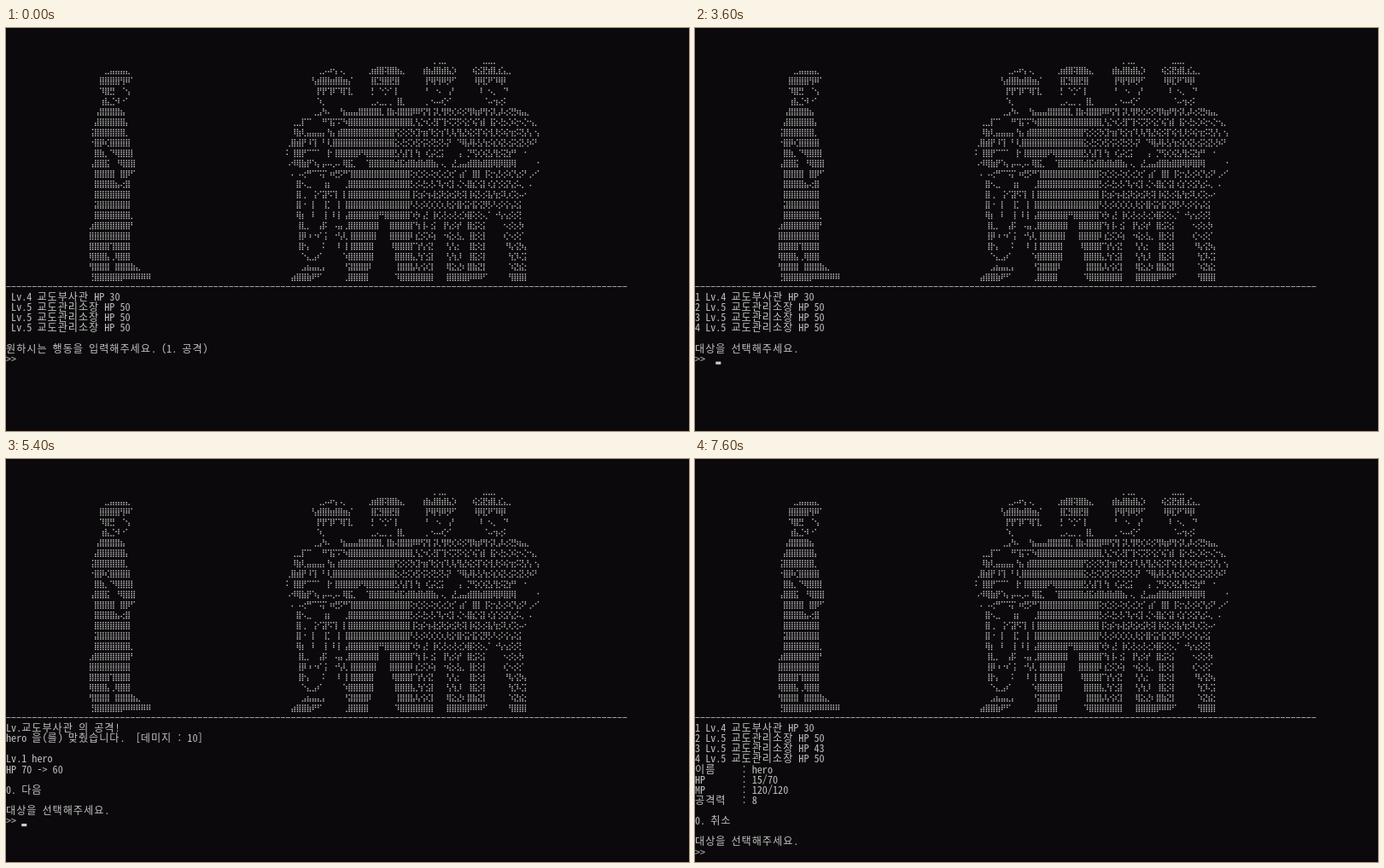
An HTML page that plays this animation: 800x473 px, repeating every 8000 ms.

```html
<!DOCTYPE html>
<html lang="ko">
<head>
<meta charset="utf-8">
<title>Console battle</title>
<style>
html, body { margin: 0; width: 100%; height: 100%; overflow: hidden; background: #0b090b; }
svg { display: block; width: 800px; height: 473px; }
text {
  font: 12.13px "Noto Sans Mono CJK KR", "Noto Sans CJK KR", "Noto Sans CJK", "Noto Sans Mono", monospace;
  fill: #c2c2c2;
  white-space: pre;
}
</style>
</head>
<body>
<svg viewBox="0 0 800 473" xmlns="http://www.w3.org/2000/svg">
  <g id="scene">
    <path id="art" fill="#bcbcbc"/>
    <line x1="0.4" x2="728" y1="303.5" y2="303.5" stroke="#a0a0a0" stroke-dasharray="5 1.067"/>
  </g>
  <g id="lines"></g>
  <rect id="cursor" width="6.07" height="3.2" fill="#cccccc"/>
</svg>
<script>
const CW = 6.067, CH = 12.133, LOOP = 8000;
const $ = id => document.getElementById(id);

// Braille art: "n" jumps to a column, "a-b" fills those columns, the rest is drawn as is.
const ART = [
  '82 ⢀⢀⣀ 92 ⣀⣀⡀',
  '19 ⣀⣤⣤⣤⣄ 60 ⢀⡠⠴⢢⠠⡀ 70 ⣰⣾⣿⢽⣿⣷⣄ 80 ⢰⣷⣼⣿⣾⣧⡱ 90 ⢮⣪⣟⣾⣇⣎⣄⡀',
  '18 ⣿⣿⣿⣿⢻⠿⠁ 59 ⢣⣾⣿⣷⣾⣿⣶⡌ 70 ⢸⣏⣻⣿⣟⣿ 81 ⡟⢿⢻⠿⡻⠋ 90 ⠸⡿⣏⠟⠹⢿⠇',
  '18 ⠹⣿⣛⠀⠈⢢ 60 ⡟⡟⢹⠏⠹⡏⣇ 70 ⢘⠀⠑⡑⠁⡇ 81 ⠃⠀⠢⠀⢠⠃ 91 ⠸⠀⠢⡀⠀⠙',
  '18 ⢰⣧⣈⠺⠐⠁ 60 ⠱⡀ 70 ⢀⡠⣀⡀⡀⢸⣇ 81 ⡀⠢⠤⢎⠊ 92 ⠈⠤⢲⢔⠅',
  '17 ⢠⣿⣿⣿⣿⣦ 59 ⢀⣠⠳⠄ 64 ⠘⣦⣤⣤ 68-71 72 ⣇⢸⣷⢼⣿⣿⡿⠿⢫⢻⢨⢇⢻⢟⢎⠮⡪⢻⢷⡾⢻⢪⢇⡼⢔⢝⡳⣦⣄',
  '17 ⣼⣿⣿⣿⣿⣿⡄ 55 ⢀⣀⡏⠉ 61 ⠛⢹⡍⠍⠳ 66-77 78 ⣇⢣⡑⢎⢜⡏⢹⠪⡩⡫⢪⡊⢮⢱⡇⢸⡕⢜⡢⡱⢕⠢⡑⢢⡀',
  '16 ⢨⣿⣿⣿⣿⣿⣿⡀ 55 ⠸⣷⢇⣤⣤⣤⡄⢳⡄⣾ 65-74 75 ⢫⡪⡪⡳⣹⢲⡎⢗⡕⡎⢇⢧⢻⣜⢮⡪⡏⢮⢺⡸⡪⢮⢲⡪⢝⡜⡄⢢',
  '16 ⠐⣿⡿⢎⣿⣿⣿⣿ 54 ⢀⣿⣾⡟⠸⢹⠀⠃⢇⣿ 64-74 75 ⣕⢜⡪⡱⣫⢪⢕⢝⡪⡣⡝⠀⠙⢿⡼⡧⣣⢳⡪⣎⢮⡣⣪⢕⣝⢜⠮⠃',
  '17 ⣿⣷⡀⠙⢿⣿⣿⡇ 54 ⠅⢸⣿⡟⠉⠉⠁⠀⡗⢸ 64-67 68 ⠟⢿ 70-74 75 ⣣⢣⡏⡇⢳⠀⢎⡬⣊⡅ 87 ⢠⠀⡙⢫⢎⢮⣣⢻⡪⣝⡞⠃⠀⠂',
  '16 ⢠⣿⣿⣯⠀⠘⢿⣿⣿ 54 ⠠⠺⢿⣷⡟⠱⡄⡤⠤⡠⠄⢿⣯⡀⠀⠈ 70-74 75 ⣾⣯⣾⣿⣾⣷⣿⣷⡄⢄⠀⣜⣠⣤⣾⣿⣷⣿⣿⢿⡿⣿⡿⡇ 102 ⠐',
  '17 ⣿⣿⣿⣿⠀⣿⡿⠋ 55 ⠄⠠⢔⠛⠉⠩⡍⠰⢞⡫⠛⢹ 67-77 78 ⢕⢎⡪⡢⢕⢎⢔⡱⡊⢠⡎⠀⣿⡇⢸⢕⢢⡣⡪⢎⢣⡪⠃ 101 ⡠⠊',
  '17 ⣿⣿⣿⣿⣦⢔⣿ 56 ⣿⠢⣀⠀⠀⢰⡆⠀⠀⢀ 66-77 78 ⡣⡪⢜⡢⡣⠹⡔⢎⡇⢌⠢⣿⣎⢪⡇⢎⡎⡪⣪⢣⡪⢄ 101 ⠄',
  '17-23 56 ⣿⢀⠀⢨⠊⣽⠫⢹⠀⡇ 66-77 78 ⢸⢕⡮⢲⢼⣪⢗⡵⣪⢗⢽⢸⢮⡣⡪⣧⢳⡪⢇⢎⢕⠤⠂',
  '17 ⣽ 18-23 56 ⣿⠐⠀⡇⠀⢸⡁⠀⡇⢸ 66-77 78 ⠣⡣⡪⢎⢎⢎⢆⢗⡕⣿⢪⡕⣯⢪⡻⡣⠣⡪⢪⢢⢕⡅',
  '17-23 24 ⡀ 56 ⢿⡆⠀⠇⠀⢸⠀⠇⡇⢠ 66-71 72 ⠛ 73-77 78 ⠱⡳⢠⡃⢸⢎⢜⢔⢜⢔⡱⣿⢕⢕⢄⠁⠐⢣⢢⡪⡪⡃',
  '16 ⣰⣿⣿⣿⣿⣿⣿⣿⠃ 56 ⢸⣇⡀⠀⢠⡯⠀⠠⣤⢀ 66-71 74-77 78 ⡏⢳⢸⠄⣪ 84 ⢸⢣⡪⡞ 89 ⣿⣪⢕⡅ 96 ⠢⡪⡢⡳',
  '16-23 56 ⢸⡿⠰⠐⠎⢨⠀⠐⢣⢇ 66 ⢸ 67-70 71 ⡇ 74-77 78 ⠇⣎⡪⡱⢵ 84 ⠐⢮⡢⣣⡀ 89 ⢸⣗⢕⡇ 96 ⢎⠢⡪⡊',
  '16 ⣿⣿⣿⣿⢹⣿⣿⣿ 56 ⢸⡗⡄⠀⠀⠅⠀⠀⠇⢸ 66 ⢸ 67-70 74 ⠸⣿⣿⣿⡏⢱⢣⢪⡃ 85 ⢣⢣⡂ 89 ⢸⣗⢕⡇ 96 ⠘⢧⢪⡳⡄',
  '16 ⢿⣿⣿⣧⢀⢿⣿⣿ 57 ⠑⣄⣠⠎ 65 ⠱ 66-70 75 ⣿⣿⣿⣧⡘⡎⣪⡇ 85 ⢣⢳⡸ 89 ⢸⣯⡪⡇ 97 ⢳⡹⢌⡅',
  '16 ⢻⣿⣿⣿⠀⣿⣿⣿⣷⣄ 57 ⣠⣦⣤⣄⡄ 65 ⠘⣽⣿⣿⣿⠇ 75 ⢸⣿⣿⣧⢧⢪⢎⡇ 85 ⢿⣕⣜⠆ 89 ⣿⣷⣝⡇ 97 ⠱⣝⣮⡂',
  '16 ⢘⣿⣿⣿⣿⣿⡿⠿⠿⠿⠿⠿ 55 ⣴⣿⣿⣷⠟⠋ 65 ⢀⣿⣿⣿⣿ 75 ⠹⣿⣿⣿⣿⣿⣿⡇ 85 ⣿⣿⣿⣿⡿⠿⠿⠋ 97 ⢻⣿⣿⡇'
];

function cell(ch, col, row) {
  const bits = ch.codePointAt(0) - 0x2800;
  let d = '';
  for (let b = 0; b < 8; b++) {
    if (!(bits >> b & 1)) continue;
    const right = b < 6 ? b > 2 : b === 7;
    const dy = b < 6 ? b % 3 : 3;
    const x = col * CW + (right ? 3.8 : 0.9), y = 33.5 + row * CH + dy * 2.4;
    d += `M${x.toFixed(2)} ${y.toFixed(2)}h1.5v1.5h-1.5z`;
  }
  return d;
}

function artPath() {
  let d = '';
  ART.forEach((line, row) => {
    let col = 0;
    for (const part of line.split(' ')) {
      const [, from, to] = part.match(/^(\d+)(?:-(\d+))?$/) || [];
      if (!from) for (const ch of part) d += cell(ch, col++, row);
      else {
        col = +from;
        while (to && col <= to) d += cell('⣿', col++, row);
      }
    }
  });
  return d;
}

const cells = s => [...s].reduce((n, ch) => n + (ch > '\u1100' ? 2 : 1), 0);

// Screens
const PLAYER = 'hero', ASK = '대상을 선택해주세요.', NEXT = '0. 다음';
const foes = (third, tag) => [
  'Lv.4 교도부사관 HP 30', 'Lv.5 교도관리소장 HP 50',
  `Lv.5 교도관리소장 HP ${third}`, 'Lv.5 교도관리소장 HP 50'
].map((s, i) => tag(i) + s);
const number = i => i + 1 + ' ';

const menu = [...foes(50, () => ' '), '', '원하시는 행동을 입력해주세요. (1. 공격)', '>> '];
const target = [...foes(50, number), '', ASK, '>>  '];
const battle = ['Battle!!', `${PLAYER} 의 공격!`,
  'Lv.5 교도관리소장을(를) 맞췄습니다. [데미지 : 7]', 'Lv.5 교도관리소장',
  'HP 50 -> 43', '', NEXT, '', '>>   '];
const hit = (foe, hp, dmg) => [`Lv.${foe} 의 공격!`,
  `${PLAYER} 을(를) 맞췄습니다.  [데미지 : ${dmg}]`, '', `Lv.1 ${PLAYER}`,
  `HP ${hp} -> ${hp - dmg}`, '', NEXT, '', ASK, '>> '];
const status = [...foes(43, number), `이름     : ${PLAYER}`, 'HP       : 15/70',
  'MP       : 120/120', '공격력   : 8', '', '0. 취소', '', ASK, '>> '];
const blank = row => Array(row + 1).fill('');
const type = (lines, key) => [...lines.slice(0, -1), lines[lines.length - 1] + key];

const hit1 = hit('교도부사관', 70, 10);
const [hit2, hit3, hit4] = [60, 45, 30].map(hp => hit('교도관리소장', hp, 15));
const retry = [...type(menu, '3'), '잘못된 입력입니다.', '>> '];

// [start in ms, screen, cursor visible]
const STEPS = [
  [0, menu, 0], [600, menu, 1], [1100, menu, 0], [1700, menu, 1], [2200, menu, 0],
  [2500, type(menu, '3'), 1], [2600, retry, 1], [3000, retry, 0], [3200, type(retry, '1'), 1],
  [3400, blank(9), 1], [3500, target, 1], [3800, target, 0], [4100, type(target, '3'), 1],
  [4200, blank(7), 1], [4300, battle, 1], [4600, battle, 0], [5000, battle, 1],
  [5100, type(battle, '0'), 1], [5200, blank(9), 1],
  [5300, hit1, 1], [5600, type(hit1, '0'), 1], [5700, blank(10), 1],
  [5800, hit2, 1], [5900, hit2, 0], [6100, hit2, 1], [6300, type(hit2, '0'), 1],
  [6400, [...type(hit2, '0'), ''], 1],
  [6500, hit3, 1], [6700, type(hit3, '0'), 1], [6800, blank(10), 1],
  [6900, hit4, 1], [7300, type(hit4, '0'), 1], [7400, blank(10), 1],
  [7500, status, 1], [7600, status, 0]
];

const rows = Array.from({ length: 13 }, (_, i) => {
  const el = document.createElementNS('http://www.w3.org/2000/svg', 'text');
  el.setAttribute('y', 320 + i * CH);
  return $('lines').appendChild(el);
});

function show([, lines, on]) {
  rows.forEach((el, i) => {
    const s = lines[i] || '';
    let col = 0;
    el.setAttribute('x', [...s].map(ch => {
      const x = (col * CW).toFixed(2);
      col += cells(ch);
      return x;
    }).join(' '));
    el.textContent = s;
  });
  const last = lines.length - 1;
  $('scene').style.display = lines[0] ? '' : 'none';
  $('cursor').style.display = on ? '' : 'none';
  $('cursor').setAttribute('x', cells(lines[last]) * CW);
  $('cursor').setAttribute('y', 318.8 + last * CH);
}

let current;
function render(ms) {
  const step = STEPS.filter(s => s[0] <= ms).pop();
  if (step !== current) show(current = step);
}

$('art').setAttribute('d', artPath());
render(0);
const start = performance.now();
(function tick() {
  render((performance.now() - start) % LOOP);
  requestAnimationFrame(tick);
})();
</script>
</body>
</html>
```
